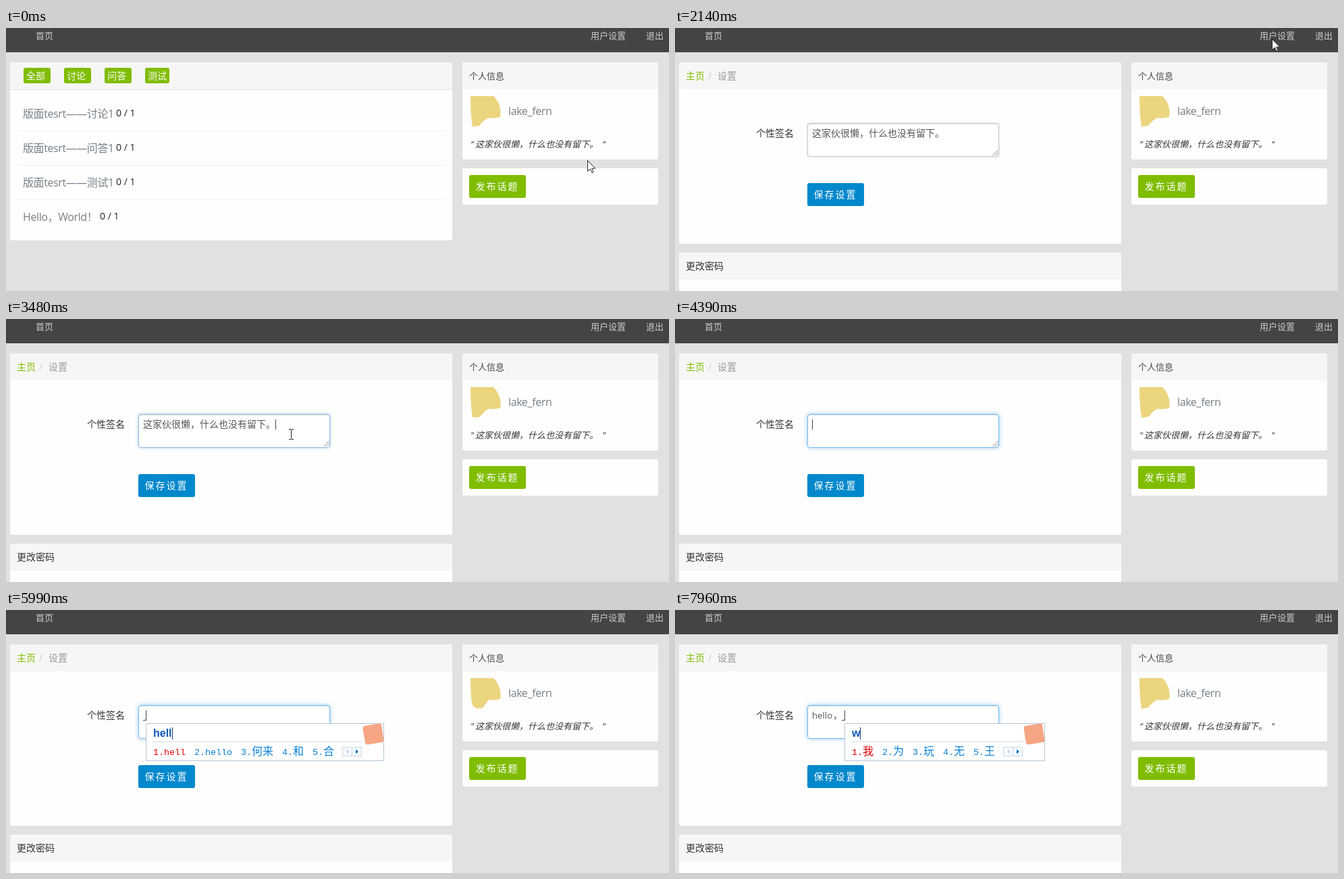
Recreate the animation shown at these times as an HTML page. Size 982x390 px, loop 8000 ms.

```html
<!DOCTYPE html>
<html lang="zh">
<head>
<meta charset="utf-8">
<title>用户设置</title>
<style>
html, body { margin: 0; width: 100%; height: 100%; overflow: hidden; background: #e1e1e1; }
#stage { position: absolute; left: 0; top: 0; width: 982px; height: 390px; overflow: hidden;
  font-family: "Open Sans", "Noto Sans CJK SC", "Noto Sans CJK", sans-serif; }
#stage div, #stage span, #stage svg { position: absolute; box-sizing: border-box; }
#stage svg { overflow: visible; left: 0; top: 0; }
span { line-height: 20px; white-space: pre; }
.title { letter-spacing: -.4px; }
.wide { letter-spacing: 2px; }
.sign { font-style: italic; }
#field { border: 1px solid #ccc; border-radius: 4px; background: #fff; }
#ime { top: 168px; height: 56px; background: #fff; border: 1px solid #b9c6d3; }
#typed { left: 10px; top: 4px; font: bold 16px/20px "Liberation Sans", Arial, sans-serif; color: #0a5cb8; }
#ime .cand { top: 30px; height: 20px; font-size: 16px; }
.cand i { font: 13.33px/20px "Liberation Mono", monospace; }
#mark { top: 1px; width: 28px; height: 28px; background: #f6a585; border-radius: 4px; transform: rotate(-9deg); }
</style>
</head>
<body>
<div id="stage"></div>
<script>
const LOOP = 8000, STEP = LOOP / 90;
const GREEN = '#80bd01';
const NOTE = '这家伙很懒，什么也没有留下。';

const box = (x, y, w, h, color, extra = '') =>
  `<div style="left:${x}px;top:${y}px;width:${w}px;height:${h}px;background:${color};${extra}"></div>`;
const text = (x, mid, size, color, str, attr = '') =>
  `<span ${attr} style="left:${x}px;top:${mid - 10}px;font-size:${size}px;color:${color}">${str}</span>`;
const panel = (x, y, w, h, head) =>
  box(x, y, w, h, '#fefefe', 'border-radius:3px') +
  (head ? box(x, y, w, 40, '#f6f6f6', 'border-radius:3px 3px 0 0') : '');
const button = (x, y, color, str) =>
  box(x, y, 84, 34, color, 'border-radius:3px') + text(x + 9.5, y + 17, 14, '#fff', str, 'class="wide"');

const tabs = [[26, 40, '全部'], [86, 40, '讨论'], [146, 40, '问答'], [206, 36, '测试']];
const topics = [['版面tesrt——讨论1', 163], ['版面tesrt——问答1', 163], ['版面tesrt——测试1', 163], ['Hello，World！', 139]];

const home = panel(6, 51, 655, 264, true) + box(6, 91, 655, 1, '#e3e3e3') +
  tabs.map(([x, w, s]) => box(x, 59, w, 23, GREEN, 'border-radius:3px') + text(x + 4, 71, 14, '#fff', s)).join('') +
  topics.map(([s, x], i) => {
    const y = 127 + 51 * i;
    return text(25, y, 16, '#778087', s, 'class="title"') + text(x, y - 1, 14, '#222', '0 / 1') +
      (i < 3 ? box(16, y + 25, 635, 1, '#f0f0f0') : '');
  }).join('');

const settings = panel(6, 51, 655, 269, true) + panel(6, 333, 655, 80, true) +
  text(16, 71, 14, GREEN, '主页') + text(49, 71, 14, '#ccc', '/') + text(63, 71, 14, '#999', '设置') +
  text(120, 156, 14, '#333', '个性签名') + text(16, 353, 14, '#333', '更改密码') +
  '<div id="field" style="left:196px;top:141px;width:284px;height:50px"></div>' +
  '<svg width="1" height="1"><path d="M470.5 189l8-8M474.5 189l4-4" stroke="#888"/></svg>' +
  text(203, 156, 14, '#555', '', 'id="note"') + text(203, 156, 13.2, '#555', '', 'id="word"') +
  text(234, 156, 14, '#555', '，', 'id="comma"') +
  '<div id="caret" style="top:149px;width:1px;height:15px;background:#444"></div>' +
  '<div id="dash" style="top:163px;width:4px;height:1px;background:#444"></div>' +
  button(196, 230, '#0088cc', '保存设置') +
  `<div id="ime"><span id="typed"></span><div id="bar" style="top:5px;width:1px;height:18px"></div>
    <div id="rule" style="left:9px;top:26px;height:1px;background:#d3dbe4"></div><div id="cands"></div>
    <svg id="pager" width="1" height="1"><path d="M.5 34.5h14v13h-14zM14.5 34.5h14v13h-14z" fill="#f6fafe" stroke="#c5d9ec"/>
    <path d="M9 38v6l-3-3z" fill="#b3c8dc"/><path d="M20 37.5v7l4-3.5z" fill="#1672c4"/></svg>
    <div id="mark"></div></div>`;

const side = panel(676, 51, 290, 144, true) + panel(676, 208, 290, 54) +
  text(686, 71, 13, '#444', '个人信息') + text(744, 123, 16, '#778087', 'lake_fern', 'class="title"') +
  text(688, 172, 13, '#333', '"', 'class="sign"') + text(695, 172, 13, '#333', NOTE, 'class="sign"') +
  text(883, 172, 13, '#333', '"', 'class="sign"') + button(686, 218, GREEN, '发布话题') +
  '<svg width="1" height="1"><path id="avatar" fill="#ecd57f"/></svg>';

document.getElementById('stage').innerHTML =
  box(0, 0, 982, 36, '#444') + text(44, 11, 13, '#ccc', '首页') +
  text(866, 11, 13, '#ccc', '用户设置', 'id="link"') + text(948, 11, 13, '#ccc', '退出') +
  `<div id="home">${home}</div><div id="settings">${settings}</div>${side}` +
  '<svg id="pointer" width="1" height="1"><path id="shape" stroke="#222"/></svg>';

const el = id => document.getElementById(id);
const show = (id, on) => { el(id).style.display = on ? '' : 'none'; };

// path, hotspot offset, fill
const cursors = {
  arrow: ['M.5 .5V16.5L4.3 13 7 18.5 9.2 17.5 6.7 12.2H11.8Z', 0, 0, '#fff'],
  hand: ['M5.5 14V2.5C5.5 0 8.5 0 8.5 2.5V9C8.5 7.5 11 7.5 11.2 9.3 11.5 8 13.6 8.2 13.8 10 14.5 9 16.3 9.4 16.3 11.5V15.5C16.3 18 14.5 19 14.5 22.5H6.5C6.3 19.5 3 17 .9 13.2.2 11.5 2.2 10.5 3.4 11.8Z', 6, 0, '#fff'],
  beam: ['M0 .5H3M4 .5H7M3.5 1V15M0 15.5H3M4 15.5H7', 3, 8, 'none']
};
const route = [[0, 861, 196], [180, 861, 196], [870, 859, 57], [1240, 884, 16], [2370, 884, 16],
  [3040, 430, 178], [3200, 430, 178], [3300, 422, 171], [LOOP, 422, 171]];

// start, end, typed letters, candidates
const inputs = [
  [4800, 5280, 'h', ['好', '号', '和', '\\(^o^)/~', '后']],
  [5280, 5540, 'he', ['和', '喝', '河', '合', '何']],
  [5540, 5900, 'hel', ['hello', '何来', '喝了', '和', '合']],
  [5900, 6200, 'hell', ['hell', 'hello', '何来', '和', '合']],
  [6200, 6875, 'hello', ['hello', 'hell', '何来', '和', '合']],
  [7810, LOOP, 'w', ['我', '为', '玩', '无', '王']]
];
const wordEnd = 6875, commaAt = 7400;

function place(t) {
  const i = route.findIndex((p, n) => n && t < p[0]);
  const [t0, x0, y0] = route[i - 1], [t1, x1, y1] = route[i];
  const u = (t - t0) / (t1 - t0), e = u * u * (3 - 2 * u);
  return [Math.round(x0 + (x1 - x0) * e), Math.round(y0 + (y1 - y0) * e)];
}

function drawPointer(t) {
  const [x, y] = place(t);
  const hover = t >= 1230 && t < 1860 || t >= 2300 && t < 2430;
  const kind = hover ? 'hand' : t > 1860 && x < 480 && y > 141 ? 'beam' : 'arrow';
  const [d, dx, dy, fill] = cursors[kind];
  el('shape').setAttribute('d', d);
  el('shape').setAttribute('fill', fill);
  el('pointer').style.transform = `translate(${x - dx}px,${y - dy}px)`;
  el('link').style.color = hover ? '#fff' : '#ccc';
  show('pointer', t < 3640);
}

function drawAvatar(t) {
  const cycle = Math.min((t + 1360) % 2870, 2690);
  const w = Math.sin(Math.floor(cycle / STEP) * 1.6) * 3;
  el('avatar').setAttribute('d',
    `M688 101H722Q735 114 732 132 722 135 715 133 ${709 + w} 137 ${704 + w} 145 695 ${147 + w / 2} 691 ${144 - w} 688 130 688 101Z`);
}

let lastInput;
function drawIme(input, left) {
  show('ime', !!input);
  if (!input || input === lastInput) return;
  lastInput = input;
  const [, , typed, list] = input;
  let x = 10;
  el('cands').innerHTML = list.map((c, i) => {
    const s = `${i + 1}.${c}`, at = x;
    x += [...s].reduce((w, ch) => w + (ch > '~' ? 16 : 8), 0) + 13;
    const html = s.replace(/[!-~]+/g, '<i>$&</i>');
    return `<span class="cand" style="left:${at}px;color:${i ? '#0a80d8' : '#e60000'}">${html}</span>`;
  }).join('');
  el('ime').style.left = left + 'px';
  el('ime').style.width = x + 62 + 'px';
  el('rule').style.width = x + 20 + 'px';
  el('pager').style.left = x - 1 + 'px';
  el('mark').style.left = x + 31 + 'px';
  el('typed').textContent = typed;
  el('bar').style.left = 10 + Math.round(el('typed').getBoundingClientRect().width) + 'px';
  el('bar').style.background = typed === 'h' ? '#f00' : '#123c78';
}

function drawField(t, now) {
  const focus = Math.max(0, Math.min(1, (now - 3310) / 250));
  const field = el('field').style;
  field.borderColor = `rgb(${204 - 87 * focus},${204 - 19 * focus},${204 + 36 * focus})`;
  field.boxShadow = `inset 0 1px 1px rgba(0,0,0,.12),0 0 ${2 + 4 * focus}px rgba(${150 - 68 * focus},${150 + 18 * focus},${150 + 86 * focus},.6)`;

  const gone = Math.max(0, Math.min(1, (t - 3640) / 370));
  const left = Math.round(NOTE.length * (1 - gone));
  el('note').textContent = NOTE.slice(0, left);
  el('word').textContent = t >= wordEnd ? 'hello' : '';
  show('comma', t >= commaAt);

  const input = inputs.find(([a, b]) => t >= a && t < b);
  const start = t >= commaAt ? 247 : t >= wordEnd ? 234 : 203 + 14 * left;
  const caret = input ? start + 4 : start;
  show('caret', t >= 3300);
  el('caret').style.left = caret + 'px';
  show('dash', !!input);
  el('dash').style.left = start + 'px';
  drawIme(input, caret);
}

function draw(now) {
  const t = Math.floor(now / STEP + .04) * STEP % LOOP;
  const second = t >= 1860;
  show('home', !second);
  show('settings', second);
  drawPointer(t);
  drawAvatar(t);
  drawField(t, now);
}

const begin = performance.now();
function tick() {
  draw((performance.now() - begin) % LOOP);
  requestAnimationFrame(tick);
}
tick();
</script>
</body>
</html>
```
